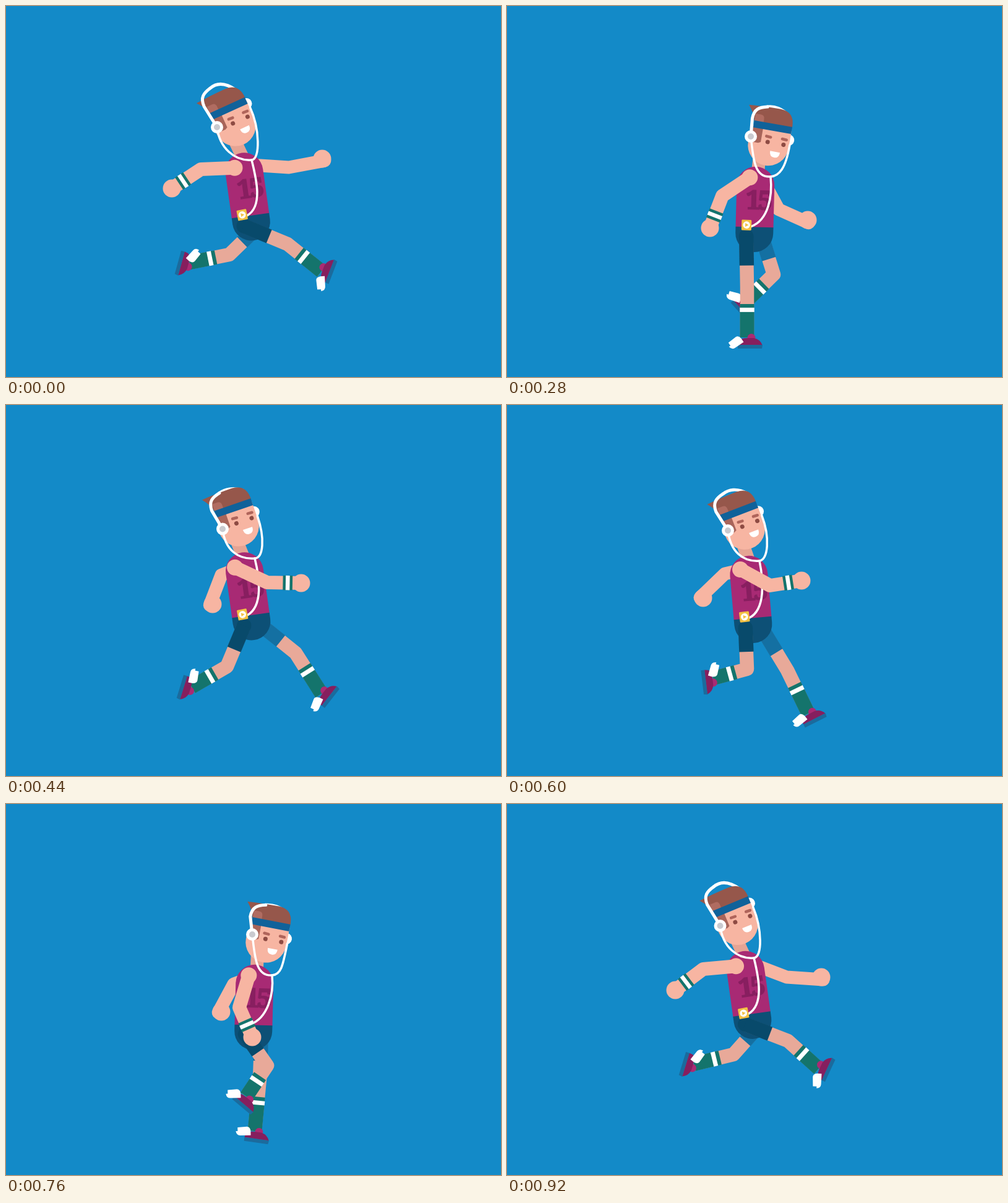
These frames come from a looping animation (800 px wide and 600 px high, 960 ms). An HTML page with a canvas:

```html
<!DOCTYPE html>
<html lang="en">
<head>
<meta charset="utf-8">
<title>Runner</title>
<style>
html, body { margin: 0; width: 100%; height: 100%; overflow: hidden; background: #138ac8; }
canvas { display: block; }
</style>
</head>
<body>
<canvas id="stage" width="800" height="600"></canvas>
<script>
const ctx = document.getElementById('stage').getContext('2d');
const LOOP = 960, STEP = 40, RAD = Math.PI / 180;
const TIMES = [0, 160, 280, 440, 600, 760, 920];
const SKIN = '#f7b5a2', LEG_SKIN = '#e8a999', SOCK = '#14746c', WHITE = '#fff';

// Smooth looping curve through one row of values per key time.
function track(rows) {
  const n = rows.length;
  const time = i => TIMES[(i + n) % n] + LOOP * Math.floor(i / n);
  const row = i => rows[(i + n) % n];
  const slope = (i, k) => {
    const before = time(i) - time(i - 1), after = time(i + 1) - time(i);
    const d0 = (row(i)[k] - row(i - 1)[k]) / before;
    const d1 = (row(i + 1)[k] - row(i)[k]) / after;
    return (d0 * after + d1 * before) / (before + after);
  };
  return t => {
    let i = n - 1;
    while (TIMES[i] > t) i--;
    const h = time(i + 1) - time(i), u = (t - time(i)) / h, v = 1 - u;
    return row(i).map((p, k) =>
      p * v * v * (1 + 2 * u) + row(i + 1)[k] * u * u * (3 - 2 * u) +
      h * u * v * (v * slope(i, k) - u * slope(i + 1, k)));
  };
}

// Global position of a local point in a frame [x, y, degrees].
function place([x, y, a], px, py) {
  const c = Math.cos(a * RAD), s = Math.sin(a * RAD);
  return [x + px * c - py * s, y + px * s + py * c];
}

const torsoAt = track([[395, 339, -8], [398.5, 350, -2], [400, 357.5, 1.5], [395.5, 340, -8],
  [397, 344.5, -5], [400, 357.5, 1.5], [395.5, 339.5, -8]]);
const headAt = track([[360, 165.5, -24.5], [387.5, 177, -15.5], [429.5, 196, 10], [368, 166.5, -19],
  [375, 172, -21], [428, 194.5, 11], [363, 166.5, -22.5]]);
// Left ear pad x, y and height of the headphone arc over the head.
const phonesAt = track([[341, 196, -43], [366, 205, -39.6], [394, 211, -32], [350, 200.5, -31.4],
  [357, 203, -36.7], [398, 211, -30], [344.5, 197, -42.4]]);
const jointAt = track([[397, 249], [413, 262], [426, 276], [402, 248], [408, 252], [430, 277], [399, 249]]);

const hips = { near: t => place(t, -13, 15), far: t => place(t, 13, 17) };
const shoulders = { near: t => place(t, -10.5 + t[2] * .5, -80), far: t => place(t, 8, -82) };

// Two-bone limb: rows give middle and end joint, motion runs on angles and lengths.
function limb(root, rows) {
  const polar = (a, b) => {
    const angle = Math.atan2(b[1] - a[1], b[0] - a[0]);
    return [angle < -Math.PI / 2 ? angle + 2 * Math.PI : angle, Math.hypot(b[0] - a[0], b[1] - a[1])];
  };
  const bones = track(rows.map(([mx, my, ex, ey], i) =>
    [...polar(root(torsoAt(TIMES[i])), [mx, my]), ...polar([mx, my], [ex, ey])]));
  const along = (p, a, d) => [p[0] + d * Math.cos(a), p[1] + d * Math.sin(a)];
  return t => {
    const start = root(torsoAt(t)), [a1, d1, a2, d2] = bones(t), mid = along(start, a1, d1);
    return [start, mid, along(mid, a2, d2)];
  };
}

const nearArmAt = limb(shoulders.near, [[315, 264, 268, 295], [326, 283, 278.5, 316], [348, 307, 328, 359],
  [422, 287, 477, 288], [425, 292, 476, 284], [377, 329, 398, 377], [317, 267, 272, 301]]);
const farArmAt = limb(shoulders.far, [[457, 261, 511, 247], [457, 293, 504, 279], [439, 329, 486, 346],
  [348, 275, 334, 322], [352, 273, 317, 312], [368, 291, 348, 336], [452, 280, 508, 280]]);
const nearLegAt = limb(hips.near, [[455, 385, 510, 429], [415, 440, 445, 516], [388, 454, 388, 536],
  [357, 423, 300, 456], [388, 427, 333, 442], [422, 423, 388.5, 473], [454, 383, 504, 428]]);
const farLegAt = limb(hips.far, [[361, 402, 296.5, 415], [408, 436, 354, 467], [431, 434, 385, 479],
  [468, 401, 510, 467], [453, 429, 487, 499], [410, 445, 402, 529], [366, 405, 302, 420.5]]);
// Shoe angle and heel wing angle relative to the shoe.
const nearShoeAt = track([[-69, -24], [11, -23], [0, -34], [107, -5], [83, 23], [40, -41], [-65, -22]]);
const farShoeAt = track([[105.5, 27], [55, 7], [48, -30], [-52, -14], [-27, -12], [8, -9], [107, 22]]);

const mix = (a, b, u) => [a[0] + (b[0] - a[0]) * u, a[1] + (b[1] - a[1]) * u];
const toward = (a, b, d) => mix(a, b, d / Math.hypot(b[0] - a[0], b[1] - a[1]));

function line(points, width, color, cap = 'butt') {
  ctx.beginPath();
  points.forEach(p => ctx.lineTo(...p));
  ctx.lineWidth = width;
  ctx.lineCap = cap;
  ctx.lineJoin = 'round';
  ctx.strokeStyle = color;
  ctx.stroke();
}
function dot([x, y], r, color) {
  ctx.beginPath();
  ctx.arc(x, y, r, 0, 7);
  ctx.fillStyle = color;
  ctx.fill();
}
function fill(d, color) {
  ctx.fillStyle = color;
  ctx.fill(new Path2D(d));
}
function wire(d, width) {
  ctx.lineWidth = width;
  ctx.lineCap = ctx.lineJoin = 'round';
  ctx.strokeStyle = WHITE;
  ctx.stroke(new Path2D(d));
}
function within([x, y, a], draw) {
  ctx.save();
  ctx.translate(x, y);
  ctx.rotate(a * RAD);
  draw();
  ctx.restore();
}

function drawLeg([hip, knee, ankle], [angle, flap], shorts) {
  line([hip, knee, ankle], 22.5, LEG_SKIN);
  dot(hip, 11.7, shorts);
  line([hip, mix(hip, knee, .58)], 23.4, shorts);
  const cuff = mix(ankle, knee, .66);
  line([cuff, ankle], 23, SOCK);
  line([toward(cuff, ankle, 6), toward(cuff, ankle, 13)], 23.4, WHITE);
  within([...ankle, angle], () => {
    fill('M-15 12H25L24 18H-15Z', '#1b6b9d');
    dot([7, .5], 6.5, '#ab2a73');
    fill('M-15 12L-14 6Q-10 1 0 1H11Q21 3 24.5 12Z', '#861f5e');
    within([-5.5, 7.5, flap], () => fill('M0 0V-7Q-1-14-6-14L-21-13V-7H-24Q-23 0-17 0Z', WHITE));
  });
}

function drawFarArm([shoulder, elbow, hand]) {
  const a = Math.atan2(hand[1] - elbow[1], hand[0] - elbow[0]) / RAD;
  line([shoulder, elbow, place([...hand, a], 3, 4)], 21, SKIN, 'round');
  dot(hand, 14.5, SKIN);
}

function drawNearArm([shoulder, elbow, hand]) {
  line([shoulder, elbow, hand], 22, SKIN, 'round');
  dot(shoulder, 13, SKIN);
  dot(hand, 14.5, SKIN);
  line([toward(hand, elbow, 14), toward(hand, elbow, 29.5)], 23.5, SOCK);
  line([toward(hand, elbow, 18.5), toward(hand, elbow, 25)], 23.5, WHITE);
}

function drawTorso(torso) {
  const top = -68 + torso[2] * .5;
  within(torso, () => {
    fill(`M-30.5 1V${top}A30.5 30.5 0 0 1 30.5 ${top}V1Z`, '#a82a74');
    fill('M-30.5 0H30.5V10A30.5 30.5 0 0 1-30.5 10Z', '#0d5076');
    ctx.font = 'bold 42px "Noto Serif", serif';
    ctx.letterSpacing = '-4px';
    ctx.fillStyle = ctx.strokeStyle = '#881f60';
    ctx.lineWidth = 1.8;
    ctx.lineJoin = 'miter';
    ctx.fillText('15', -15, -29);
    ctx.strokeText('15', -15, -29);
  });
}

function drawPlayer(torso, joint) {
  const at = place(torso, -13, -3);
  const end = place([...at, torso[2]], 8, 2), bend = place(torso, 22, -12);
  wire(`M${joint}C${joint[0] + 4 - torso[2] * .5} ${joint[1] + 32} ${bend} ${end}`, 3.5);
  within([...at, torso[2] * 1.3], () => {
    fill('M-6.5-8.5H6.5Q8-8.5 8-7V7Q8 8.5 6.5 8.5H-6.5Q-8 8.5-8 7V-7Q-8-8.5-6.5-8.5Z', '#f3c143');
    dot([0, 0], 5.8, WHITE);
    fill('M-2-3L3.5 0L-2 3Z', '#f3c143');
  });
}

function drawHead(head, pad, top) {
  within(head, () => {
    dot([29, top + 48], 9, WHITE);
    wire(`M-14 ${top + 1}C-4 ${top - 2} 10 ${top - 1} 23-22`, 5);
    fill('M-31 0H31V30A33 33 0 0 1-35 30Q-35 20-31 12Z', SKIN);
    fill('M-31 4H-15V27L-19 29H-31Z', '#a9655a');
    fill('M-44-29Q-20-31 8-31Q30-30 31-8V-4H-31Q-33-16-44-29Z', '#96574b');
    fill('M-31-4V-17H-22Q-16-17-16-10V-4Z', '#b06c61');
    fill('M-31-5.7H31V5.8H-31Z', '#10629a');
    for (const x of [-4, 22]) {
      dot([x, 25], 3.5, '#8e4b43');
      line([[x - 3.5, 16], [x + 3.5, 16.5]], 4.6, '#b0655b', 'round');
    }
    fill('M2.5 38.5H18.5Q18.5 48 10.5 48Q2.5 48 2.5 38.5Z', WHITE);
  });
  const curve = (...points) => points.map(p => place(head, ...p)).join(' ');
  wire(`M${pad}L${curve([-35, top + 24])}C${curve([-35, top + 8], [-27, top + 4], [-14, top + 1])}`, 5);
}

function drawPhones(head, pad, top, joint) {
  const [x, y] = joint;
  wire(`M${pad}C${pad[0] + 4} ${pad[1] + 34} ${x - 27} ${y + 2} ${joint}` +
    `C${x + 14} ${y - 1} ${place(head, 32, top + 94)} ${place(head, 32, top + 56)}`, 3.5);
  dot(pad, 10, WHITE);
  dot(pad, 5, '#c9cacf');
}

function draw(t) {
  const torso = torsoAt(t), head = headAt(t), joint = jointAt(t);
  const [padX, padY, top] = phonesAt(t), pad = [padX, padY];
  ctx.fillStyle = '#138ac8';
  ctx.fillRect(0, 0, 800, 600);
  drawFarArm(farArmAt(t));
  drawLeg(farLegAt(t), farShoeAt(t), '#1470a2');
  line([place(torso, 3, -88), place(head, -13, 45)], 21, '#e5a494');
  drawTorso(torso);
  drawLeg(nearLegAt(t), nearShoeAt(t), '#084a6b');
  drawPlayer(torso, joint);
  drawNearArm(nearArmAt(t));
  drawHead(head, pad, top);
  drawPhones(head, pad, top, joint);
}

function tick() {
  draw(Math.floor(performance.now() % LOOP / STEP) * STEP);
  requestAnimationFrame(tick);
}
tick();
</script>
</body>
</html>
```
